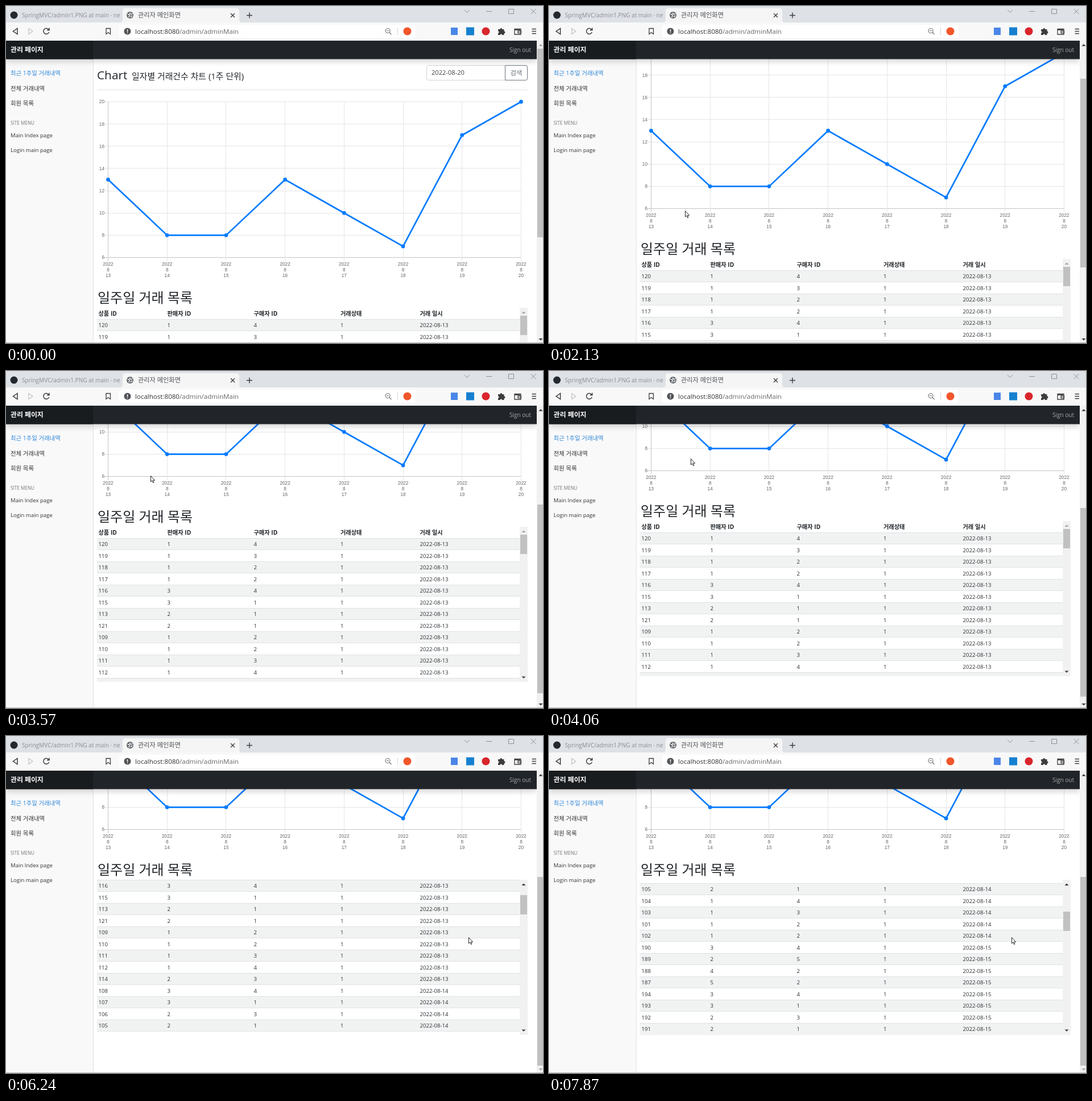
An HTML page for the animation above (8000 ms loop, 944 by 593 pixels).

```html
<!DOCTYPE html>
<html lang="ko">
<head>
<meta charset="utf-8">
<title>관리자 메인화면</title>
<style>
  html, body { margin: 0; width: 100%; height: 100%; overflow: hidden; background: #fff; }
  svg { display: block; }
  #stage { width: 944px; height: 593px; }
  text { font-family: 'Open Sans', 'Noto Sans CJK KR', 'Noto Sans CJK', sans-serif; white-space: pre; }
  .tick { font-family: 'Liberation Sans', sans-serif; }
  .icon { fill: none; stroke: #3c3c3c; stroke-width: 1.5; }
  .thin { fill: none; stroke: #8b8e92; stroke-width: 1; }
  #nav { filter: drop-shadow(0 5px 5px rgba(0, 0, 0, .15)); }
</style>
</head>
<body>
<svg id="stage" viewBox="0 0 944 593">
  <rect width="944" height="593" fill="#fff"/>

  <svg x="154" y="93" width="779" height="499">
    <g id="page">
      <path d="M160 147.5H917" stroke="#dee2e6"/>
      <rect x="739.5" y="104.5" width="177" height="26" rx="3" fill="#fff" stroke="#ced4da"/>
      <path d="M877.5 104.5H913.5a3 3 0 0 1 3 3V127.5a3 3 0 0 1 -3 3H877.5Z" fill="#fff" stroke="#6c757d"/>
      <g id="chart"></g>
      <svg x="160" y="531" width="757" height="273">
        <rect width="757" height="273" fill="#fff"/>
        <g id="rows"></g>
        <rect x="743" width="14" height="273" fill="#f1f1f1"/>
        <rect id="rowThumb" x="744" y="14" width="12" height="34" fill="#c1c1c1"/>
        <path id="rowUp" d="M746.5 10L750 6.5 753.5 10Z"/>
        <path d="M746.5 263.5L750 267 753.5 263.5Z" fill="#404040"/>
      </svg>
    </g>
  </svg>

  <g id="side">
    <rect y="93" width="153" height="500" fill="#f9f9fa"/>
    <path d="M153.5 93V593" stroke="#e3e4e5"/>
  </g>
  <g id="nav">
    <rect y="61" width="933" height="32.5" fill="#212529"/>
    <rect y="61" width="153" height="32.5" fill="#191c1f"/>
  </g>

  <rect x="933" y="61" width="11" height="532" fill="#f1f1f1"/>
  <rect id="thumb" x="934" y="75" width="10" height="332" fill="#c1c1c1"/>
  <path id="up" d="M936.5 70.5L940 67 943.5 70.5Z"/>
  <path id="down" d="M936.5 585L940 588.5 943.5 585Z"/>
  <path d="M0 592.5H944" stroke="#b9bbbd"/>

  <g id="chrome">
    <rect width="944" height="30" fill="#dee1e6"/>
    <path d="M199 29.5Q205 29.5 205 24V9Q205 4 210 4H405Q410 4 410 9V24Q410 29.5 416 29.5Z" fill="#f5f5f6"/>
    <rect y="29" width="944" height="32" fill="#f8f8f9"/>
    <rect x="199" y="33" width="521" height="23" rx="4" fill="#fff"/>
    <circle cx="14" cy="16" r="6.5" fill="#24292f"/>
    <circle cx="218" cy="16" r="6" fill="#5f6368"/>
    <path d="M213.5 14.5l3 .5 1 2-1.5 1.5.5 2M218 11.5l-.5 2 2 1.2 3-1.2M219.5 20l.5-2.2 2.5-.5" fill="none" stroke="#f5f5f6" stroke-width="1.4"/>
    <path class="icon" d="M395 13l7 7m0-7l-7 7M423 16.5H433M428 11.5V21.5" style="stroke-width:1.4"/>
    <path class="thin" d="M806 7l4.5 4.5L815 7M844 9.5H854M883.5 5.5h9v8h-9zM922.5 5l9 9m0-9l-9 9"/>
    <path class="icon" d="M20 39.5V49.5L12.5 44.5Z"/>
    <path class="icon" d="M40 39.5V49.5L47 44.5Z" style="stroke:#c0c2c5;stroke-width:1.2"/>
    <path class="icon" d="M75.3 42A5 5 0 1 0 75.6 46M76 38.5V42.5H72"/>
    <path class="icon" d="M176 39.5h7.5v10l-3.75-3-3.75 3z" style="stroke-width:1.3"/>
    <circle cx="213.500" cy="44.500" r="6" fill="#505356"/>
    <path d="M213.500 41V45.500M213.500 46.800V48.300" stroke="#fff" stroke-width="1.5"/>
    <circle class="icon" cx="671" cy="43.500" r="4" style="stroke:#777;stroke-width:1.2"/>
    <path class="icon" d="M669 43.500H673M674 46.500L677.500 50" style="stroke:#777;stroke-width:1.2"/>
    <path d="M688.500 38V51" stroke="#d5d7da"/>
    <circle cx="705.500" cy="44.500" r="7" fill="#f2562b"/>
    <rect x="782" y="38" width="12" height="13" fill="#4a86e8"/>
    <rect x="809" y="37.500" width="14" height="14" fill="#1680d0"/>
    <circle cx="843.500" cy="44.500" r="7" fill="#d9252c"/>
    <path d="M865 41h3.300a2 2 0 1 1 4 0h3.200v3.200a2 2 0 1 1 0 4V51h-3.500a1.700 1.700 0 0 0-3.400 0H865v-3.400a1.700 1.700 0 0 0 0-3.400Z" fill="#3c3c3c"/>
    <path class="icon" d="M894 40.500H905V50H894ZM894 42H904M900 44H905.500V47.500H900Z" style="stroke-width:1.3"/>
    <path class="icon" d="M924.500 40.500H932M924.500 44.500H932M924.500 48.500H932"/>
  </g>

  <path id="cursor" d="M.5 .5V11L2.800 8.900 4.500 12.700 6 12 4.400 8.300H7.600Z" fill="#fff" stroke="#111" stroke-width=".9"/>
</svg>

<script>
const $ = id => document.getElementById(id);

function add(parent, tag, attrs, content) {
  const el = document.createElementNS('http://www.w3.org/2000/svg', tag);
  for (const k in attrs) el.setAttribute(k, attrs[k]);
  if (content) el.textContent = content;
  parent.appendChild(el);
  return el;
}

// Text placed by left edge and vertical centre of its capitals.
function label(parent, x, cy, size, str, fill = '#212529', more = {}) {
  return add(parent, 'text', { x, y: cy + size * .36, 'font-size': size, fill, ...more }, str);
}

const bold = { 'font-weight': 700 };

// Browser frame
const chrome = $('chrome');
label(chrome, 28, 16, 10.1, 'SpringMVC/admin1.PNG at main · ne', '#8b8f94');
label(chrome, 232, 16, 11.2, '관리자 메인화면', '#505357');
const url = label(chrome, 227, 44.5, 11.57, '', '#333');
add(url, 'tspan', {}, 'localhost:8080');
add(url, 'tspan', { fill: '#666' }, '/admin/adminMain');

// Navigation
label($('nav'), 8, 77, 11.9, '관리 페이지', '#fff', { 'font-weight': 600 });
label($('nav'), 885, 77.5, 10, 'Sign out', '#a6a8a9');
const side = $('side');
label(side, 8, 118, 10.4, '최근 1주일 거래내역', '#2f86d6');
label(side, 8, 145, 10.4, '전체 거래내역', '#333');
label(side, 8, 171.5, 10.4, '회원 목록', '#333');
label(side, 8, 206, 8.2, 'SITE MENU', '#777');
label(side, 8, 227.5, 9.6, 'Main Index page', '#333');
label(side, 8, 254, 9.6, 'Login main page', '#333');

// Page headings
const page = $('page');
label(page, 160, 121.5, 20.8, 'Chart');
label(page, 221, 123.5, 14.9, '일자별 거래건수 차트 (1주 단위)');
label(page, 748, 117.5, 11.1, '2022-08-20', '#444');
label(page, 886.5, 117.5, 11.4, '검색', '#6c757d');
label(page, 161, 513, 24, '일주일 거래 목록');

// Chart
const chart = $('chart');
const px = i => 179.5 + i * 103.71;
const py = v => 442.5 - (v - 6) * 19.571;
const deals = [13, 8, 8, 13, 10, 7, 17, 20];
const snap = n => Math.floor(n) + .5;
for (let v = 6; v <= 20; v += 2) {
  add(chart, 'path', { d: `M173 ${snap(py(v))}H905.5`, stroke: v > 6 ? '#e5e5e5' : '#c4c4c4' });
  label(chart, 173, py(v), 8.3, v, '#666', { class: 'tick', 'text-anchor': 'end' });
}
deals.forEach((v, i) => {
  add(chart, 'path', { d: `M${snap(px(i))} 168.5V449`, stroke: i ? '#e5e5e5' : '#c4c4c4' });
  [2022, 8, 13 + i].forEach((part, k) =>
    label(chart, px(i), 454.5 + k * 9.6, 8.3, part, '#666', { class: 'tick', 'text-anchor': 'middle' }));
});
add(chart, 'polyline', {
  points: deals.map((v, i) => px(i) + ',' + py(v)).join(' '),
  fill: 'none', stroke: '#007bff', 'stroke-width': 2.7, 'stroke-linejoin': 'round'
});
deals.forEach((v, i) => add(chart, 'circle', { cx: px(i), cy: py(v), r: 3.4, fill: '#007bff' }));

// Table: each entry is a product id followed by seller and buyer digits
const rows = $('rows');
const rowH = 20.5, cols = [2.5, 123.5, 275.5, 428, 567.5];
const deal = `12014 11913 11812 11712 11634 11531 11321 12121 10912 11012
  11113 11214 11423 10834 10731 10623 10521 10414 10313 10112 10212
  19034 18925 18842 18752 19434 19331 19223 19121`.split(/\s+/);
['상품 ID', '판매자 ID', '구매자 ID', '거래상태', '거래 일시'].forEach((s, i) =>
  label(rows, cols[i], 10, 10.2, s, '#212529', bold));
deal.forEach((d, i) => {
  const y = rowH * (i + 1);
  if (i % 2 === 0) add(rows, 'rect', { y, width: 743, height: rowH, fill: '#f1f2f2' });
  add(rows, 'path', { d: `M0 ${snap(y - .5)}H743`, stroke: '#dee2e6' });
  const day = i < 13 ? 13 : i < 21 ? 14 : 15;
  [d.slice(0, 3), d[3], d[4], '1', '2022-08-' + day].forEach((s, k) =>
    label(rows, cols[k], y + 10.5, 9.6, s, '#2b2f33'));
});

// Motion: the picture is refreshed only within bursts of [start, end, steps].
const LOOP = 8000;
const bursts = [
  [600, 1440, 13], [1840, 2130, 5], [2390, 2600, 4], [2790, 3080, 5], [3080, 3570, 8],
  [3650, 4060, 7], [4060, 4390, 5], [4460, 5230, 12], [5300, 5370, 2],
  [5570, 5780, 4], [6240, 6440, 4], [6920, 7060, 3], [7650, 7870, 4]
];
// Wheel notches: [start, end, distance]
const notch = 85.5;
const pageWheel = [[1770, 2130, notch], [2312, 2600, notch], [3220, 3500, notch], [3920, 4200, 21.5]];
const rowWheel = [[5492, 5780, notch], [6162, 6440, notch], [6842, 7060, notch], [7572, 7870, notch]];
// Pointer: [time, x, y]
const path = [
  [600, 7, 420], [1000, 140, 388], [1370, 234, 362], [1440, 239, 360], [2720, 239, 360],
  [3080, 253, 274], [3570, 254, 184], [4060, 249, 154], [4390, 239, 147],
  [4640, 345, 186], [4950, 640, 303], [5230, 809, 354], [5370, 813, 354]
];

function heldTime(t) {
  let held = 0;
  for (const [a, b, n] of bursts) {
    if (t < a) break;
    const step = (b - a) / (n - 1);
    held = a + Math.min(n - 1, Math.floor((t - a) / step + 1e-6)) * step;
  }
  return held;
}

function scrolled(wheel, t) {
  return wheel.reduce((sum, [a, b, dist]) => {
    const p = Math.min(1, Math.max(0, (t - a) / (b - a)));
    return sum + dist * p * p * (3 - 2 * p);
  }, 0);
}

function pointer(t) {
  const k = path.findIndex(p => p[0] > t);
  if (k < 0) return path[path.length - 1].slice(1);
  const [a, b] = [path[Math.max(0, k - 1)], path[k]];
  const p = (t - a[0]) / (b[0] - a[0] || 1);
  return [1, 2].map(i => Math.round(a[i] + (b[i] - a[i]) * p));
}

const arrowFill = live => live ? '#333' : '#a3a3a3';

function draw(t) {
  const s = Math.round(scrolled(pageWheel, t));
  const r = scrolled(rowWheel, t);
  page.setAttribute('transform', `translate(-154 ${-93 - s})`);
  rows.setAttribute('transform', `translate(0 ${-Math.round(r)})`);
  $('thumb').setAttribute('y', Math.round(75 + s * .622));
  $('rowThumb').setAttribute('y', Math.round(14 + r * .123));
  $('up').setAttribute('fill', arrowFill(s > 0));
  $('down').setAttribute('fill', arrowFill(s < 278));
  $('rowUp').setAttribute('fill', arrowFill(r > 0));
  const cursor = $('cursor');
  cursor.style.visibility = t < 600 ? 'hidden' : 'visible';
  if (t >= 600) cursor.setAttribute('transform', `translate(${pointer(t).join(' ')})`);
}

function frame() {
  draw(heldTime(performance.now() % LOOP));
  requestAnimationFrame(frame);
}
frame();
</script>
</body>
</html>
```
